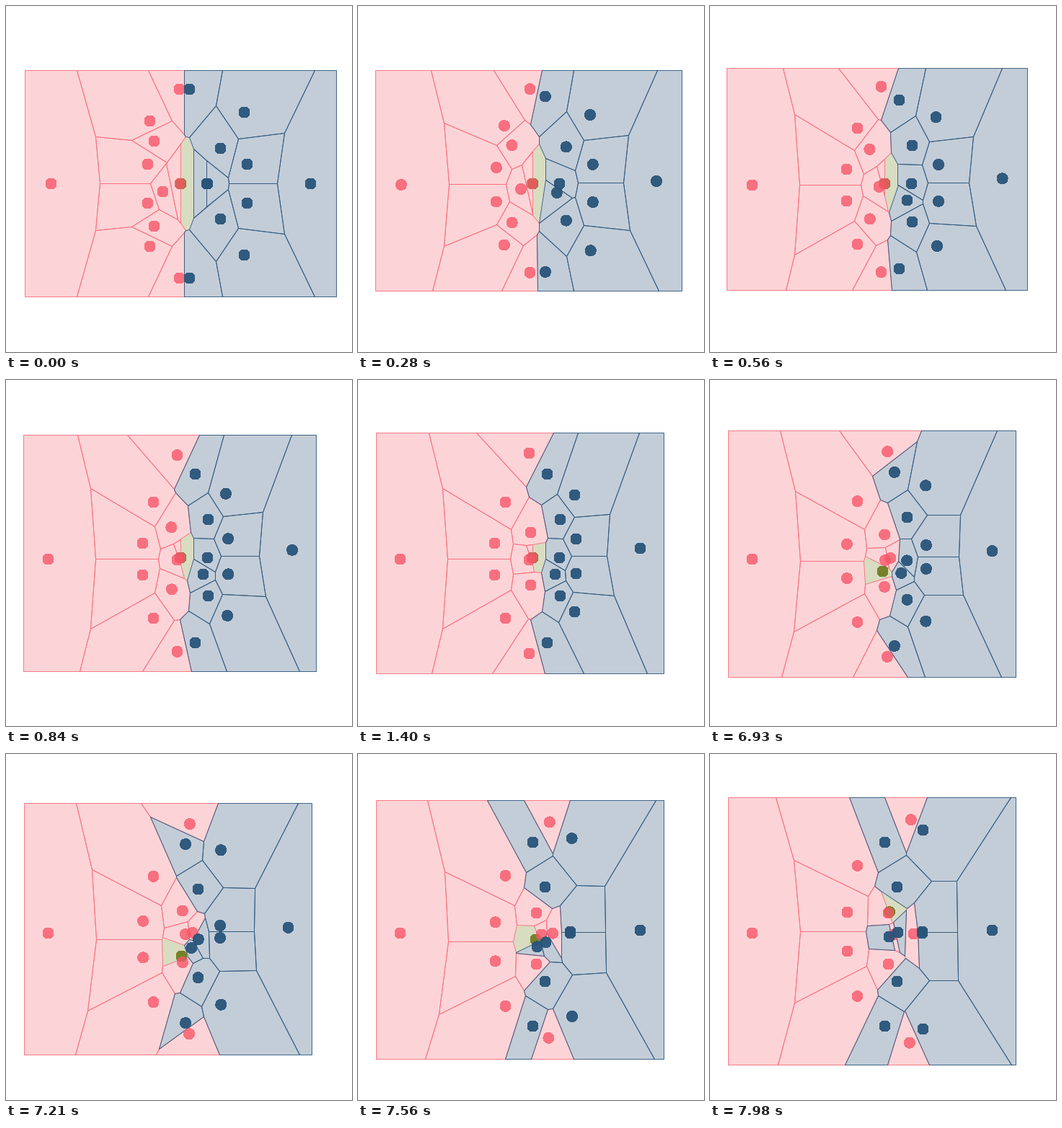
Animation, 480 px wide and 480 px high, one loop 8 s. Source, as a matplotlib script:

```python
import numpy as np
import matplotlib.pyplot as plt
from matplotlib.animation import FuncAnimation
from matplotlib.collections import PolyCollection

SIZE, DPI = 480, 100
PX = 72 / DPI             # one pixel in points
LOOP, TICK, STEP = 8000, 20, 70
RESTART = 6650            # ms at which play begins
SETTLE, PLAY = 20, 19     # steps of the line-up and of the play
SPEED = 2.2               # walking speed per step
ASPECT = 1.5              # vertical stretch of the pitch
WEIGHT = np.array([1, 1 / ASPECT ** 2])

# Rows of a squad: four upper players, their four lower partners,
# then the keeper and two central players.
WINGS = [0, 4]
CHASERS = [1, 2, 5, 6, 20, 21]


def squad(x, mid, gap, inner):
    """Four pairs, each mirrored about its own middle height."""
    x, gap = np.array(x, float), np.array(gap)
    return np.vstack([np.column_stack([x, mid - gap]),
                      np.column_stack([x, mid + gap]), inner])


def formation(pink, blue):
    return np.vstack([squad(*pink), squad(*blue)])


START = formation(
    ([240, 199, 196, 205], 246, [131, 87, 27, 59],
     [(62, 246), (217, 257), (241, 246)]),
    ([254, 330, 334, 297], 246, [131, 99, 27, 49],
     [(422, 246), (279, 246), (278, 246)]))
LINEUP = formation(
    ([237, 204, 189, 239], np.array([240, 249.5, 248, 247.5]),
     [139, 80.5, 22, 36.5], [(58, 248), (237, 249), (241, 246)]),
    ([262, 300, 302, 280], np.array([247, 240, 244, 246]),
     [117, 81, 24, 53], [(391, 233), (279, 246), (273, 269)]))
SPREAD = formation(
    ([279, 204, 190, 247], np.array([246, 245, 246, 255.5]),
     [155.5, 90.5, 27, 35.5], [(58, 248), (254, 250), (282, 249)]),
    ([242, 295, 294, 259], np.array([249.5, 243, 247, 249.5]),
     [127.5, 138, 1, 65.5], [(391, 244), (260, 247), (248, 253)]))

KICKOFF_SPOT = (242, 246)
PASSES = np.array([(235, 250), (243, 280), (246, 257), (248.5, 218.8)])
PASS_STEPS = (0, 8, 13, 19)


def by_team(ball, pink, blue):
    return [ball] + [pink] * 11 + [blue] * 11


FILLS = by_team('#d8dcc1', '#fcd4d7', '#c3cdd8')
LINES = by_team('#d8dcc1', '#fa7080', '#325b80')
DOTS = by_team((0.44, 0.49, 0.13, 0.95), (0.97, 0.34, 0.41, 0.8),
               (0.16, 0.33, 0.48, 0.95))


def walk(a, b, k, least):
    """Everyone walks straight at one speed, short trips more slowly."""
    dist = np.sqrt(((b - a) ** 2 * WEIGHT).sum(axis=1))
    part = np.minimum(k / np.maximum(dist / SPEED, least), 1)
    return a + (b - a) * part[:, None]


def lineup(k):
    pts = walk(START, LINEUP, k, 6)
    dip = 11 * np.sin(np.pi * min(k / 13, 1))
    pts[WINGS, 1] += [dip, -dip]
    return np.vstack([KICKOFF_SPOT, pts])


def play(k):
    pts = walk(LINEUP, SPREAD, k, 12)
    pts[CHASERS, 1] += 14 * np.sin(np.pi * (k / PLAY) ** 1.6)
    ball = [np.interp(k, PASS_STEPS, PASSES[:, i]) for i in (0, 1)]
    return np.vstack([ball, pts])


def clip(poly, nx, ny, limit):
    """Keep the part of poly where nx*x + ny*y <= limit."""
    out = []
    for (px, py), (qx, qy) in zip(poly, poly[1:] + poly[:1]):
        dp = nx * px + ny * py - limit
        dq = nx * qx + ny * qy - limit
        if dp <= 0:
            out.append((px, py))
        if dp * dq < 0:
            f = dp / (dp - dq)
            out.append((px + (qx - px) * f, py + (qy - py) * f))
    return out


def cells(pts):
    """Voronoi cells inside the bounding box widened by a tenth."""
    low, high = pts.min(axis=0), pts.max(axis=0)
    pad = (high - low) / 10
    (x0, y0), (x1, y1) = low - pad, high + pad
    result = []
    for i, p in enumerate(pts):
        poly = [(x0, y0), (x1, y0), (x1, y1), (x0, y1)]
        for j, q in enumerate(pts):
            if i != j and poly:
                nx, ny = (q - p) * WEIGHT
                mid = (p + q) / 2
                poly = clip(poly, nx, ny, nx * mid[0] + ny * mid[1])
        result.append(np.rint(np.array(poly).reshape(-1, 2)))
    return result


poses = [lineup(k) for k in range(SETTLE + 1)]
poses += [play(k) for k in range(PLAY + 1)]
scenes = [(pts, cells(pts)) for pts in poses]

fig = plt.figure(figsize=(SIZE / DPI, SIZE / DPI), dpi=DPI, facecolor='white')
ax = fig.add_axes([0, 0, 1, 1])
ax.set_xlim(-0.5, SIZE - 0.5)
ax.set_ylim(SIZE - 0.5, -0.5)
ax.axis('off')

areas = PolyCollection([], facecolors=FILLS, edgecolors='none',
                       antialiased=False, zorder=1)
edges = PolyCollection([], facecolors='none', edgecolors=LINES,
                       linewidths=0.9 * PX, zorder=2)
ax.add_collection(areas)
ax.add_collection(edges)
dots = ax.scatter(*poses[0].T, s=(15 * PX) ** 2, c=DOTS, linewidths=0,
                  antialiased=False, zorder=3)


def update(n):
    t = n * TICK + TICK // 2
    if t < RESTART:
        i = min(t // STEP, SETTLE)
    else:
        i = SETTLE + 1 + (t - RESTART) // STEP
    pts, polys = scenes[i]
    areas.set_verts(polys)
    edges.set_verts(polys)
    dots.set_offsets(pts)
    return areas, edges, dots


anim = FuncAnimation(fig, update, frames=LOOP // TICK, interval=TICK,
                     repeat=True, repeat_delay=0, blit=False)
plt.show()
```
